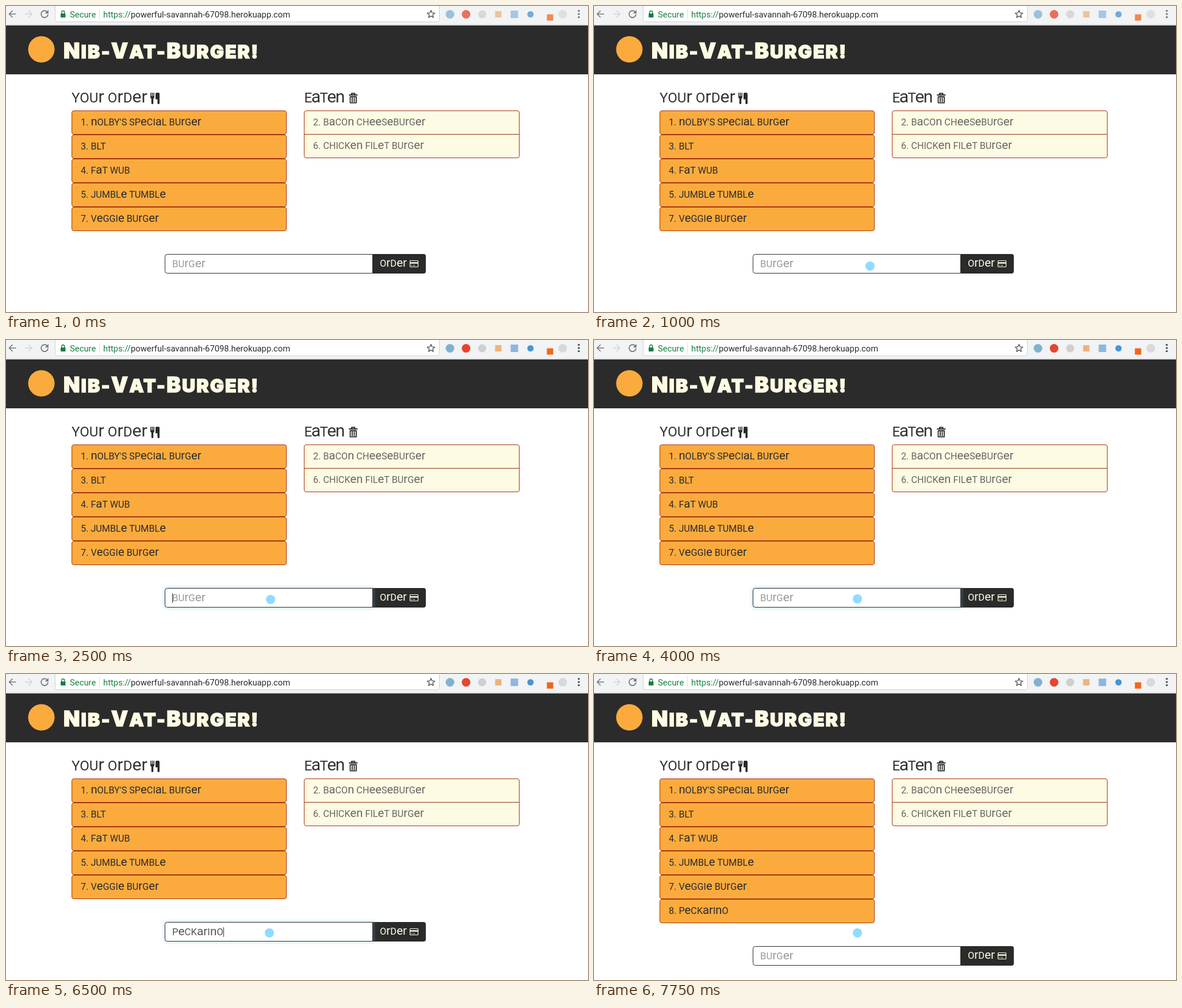
Write an HTML page that moves like this. It is 1012 px wide and 533 px high and loops after 8000 ms.

```html
<!DOCTYPE html>
<html lang="en">
<head>
<meta charset="utf-8">
<title>Burger order</title>
<style>
  html, body { margin: 0; width: 100%; height: 100%; overflow: hidden; background: #fff; }
  svg { display: block; width: 1012px; height: 533px; }
  text { font-family: Roboto, "Open Sans", sans-serif; font-size: 16.2px; fill: #2b2b2b; }
  .low { font-size: 1.25em; }
  .head { font-size: 24.2px; fill: #333; }
  .tight { letter-spacing: -1.6px; }
  .url { font-size: 14.8px; }
  .secure { fill: #1a7f42; }
  .brand { font-family: Inter, "Open Sans", sans-serif; font-weight: 900; font-size: 32px;
    letter-spacing: 2.1px; fill: #fdfbe3; stroke: #fdfbe3; stroke-width: 1.4; }
  .big { font-size: 37px; }
  .field { font-size: 16.7px; fill: #555; }
  .hint { fill: #999; }
  .button { font-size: 16.5px; fill: #fdfbe3; }
  .line { fill: none; stroke-linecap: round; stroke-linejoin: round; }
  .todo { fill: #fbab3e; stroke: #a8320c; }
  .eaten { fill: #fdfbe3; stroke: #a8320c; }
  .muted { fill: #666; }
</style>
</head>
<body>
<svg viewBox="0 0 1012 533">
  <defs>
    <filter id="blur" x="-10%" y="-60%" width="120%" height="220%"><feGaussianBlur stdDeviation="2.6"/></filter>
  </defs>

  <!-- browser bar -->
  <rect width="1012" height="34" fill="#f1f3f4"/>
  <rect y="32.5" width="1012" height="1.5" fill="#c9cbcc"/>
  <rect x="85.5" y="-4.5" width="668" height="32" rx="4" fill="#fff" stroke="#cfd1d2"/>
  <path class="line" d="M17 14H5.5m5.5-5.5L5.5 14l5.5 5.5" stroke="#777" stroke-width="1.6"/>
  <path class="line" d="M33.5 14H45m-5.5-5.5L45 14l-5.5 5.5" stroke="#d2d4d5" stroke-width="1.6"/>
  <g id="reload">
    <path class="line" d="M71.5 10A6 6 0 1 0 73 15" stroke="#757575" stroke-width="1.7"/>
    <path d="M73.8 7v6h-6z" fill="#757575"/>
  </g>
  <path id="stop" class="line" d="M61.5 8.5l11 11m0-11l-11 11" stroke="#666" stroke-width="1.7"/>
  <rect x="95" y="13" width="8.5" height="7" rx="1" fill="#1a7f42"/>
  <path class="line" d="M96.8 13v-2a2.45 2.45 0 0 1 4.9 0v2" stroke="#1a7f42" stroke-width="1.4"/>
  <text class="url secure" x="111" y="20">Secure</text>
  <path d="M162.5 5v18" stroke="#dcdcdc"/>
  <text class="url" x="169" y="20"><tspan class="secure">https://</tspan>powerful-savannah-67098.herokuapp.com</text>
  <path id="star" class="line" stroke="#555" stroke-width="1.4"/>
  <g id="tools"></g>

  <!-- page header -->
  <rect y="34" width="1012" height="85" fill="#2b2b2b"/>
  <circle cx="61.5" cy="75.5" r="23" fill="#fbab3e"/>
  <text id="brand" class="brand" x="100" y="91"></text>

  <!-- lists -->
  <text class="head" x="114" y="168" data-text="Your Order"></text>
  <g fill="#2b2b2b">
    <path d="M251 151h1.5v6h1.2v-6h1.6v6h1.2v-6h1.5v7.5q0 2-1.8 3v8.5q-1.7 1.8-3.4 0v-8.5q-1.8-1-1.8-3z"/>
    <path d="M260 153q0-2 2-2h3q2 0 2 2v17q-1.8 1.8-3.6 0v-7.5H260z"/>
  </g>
  <text class="head tight" x="518.5" y="168"><tspan>E</tspan><tspan data-text="aten"></tspan></text>
  <g class="line" stroke="#2b2b2b">
    <path d="M597 155h13.5m-9.5-.5v-2.3h5.500v2.300" stroke-width="2"/>
    <path d="M598.5 158h10.5v10.7h-10.5zM602 160v6.5m3.5-6.5v6.5" stroke-width="1.8"/>
  </g>
  <g id="todo"></g>
  <rect class="eaten" x="518.5" y="182.5" width="374" height="82" rx="3.5"/>
  <path d="M519 223.5h373" stroke="#8f3318"/>
  <text class="muted" x="534" y="208" data-text="2. Bacon cheeseburger"></text>
  <text class="muted" x="534" y="249" data-text="6. Chicken filet burger"></text>

  <!-- order form -->
  <g id="form">
    <path d="M637 432h89q4 0 4 4v26q0 4-4 4h-89z" fill="#2b2b2b"/>
    <path id="glow" d="M637.5 432.5h-357q-4 0-4 4v25q0 4 4 4h357z" fill="none" stroke="#66afe9" stroke-width="4" filter="url(#blur)"/>
    <path d="M637.5 432.5h-357q-4 0-4 4v25q0 4 4 4h357z" fill="#fff" stroke="#2b2b2b"/>
    <text id="field" class="field" x="289" y="455"></text>
    <rect id="caret" y="441" width="1" height="17" fill="#333"/>
    <text class="button" x="650" y="454" data-text="Order"></text>
    <rect x="702.5" y="443.5" width="14" height="11" rx="1" fill="none" stroke="#fdfbe3" stroke-width="1.2"/>
    <path d="M702.5 447.5h14" stroke="#fdfbe3" stroke-width="2.5"/>
    <path d="M704.5 452h2m1.5 0h3" stroke="#fdfbe3"/>
  </g>

  <circle id="pointer"/>
</svg>
<script>
  const LOOP = 8000, TICK = 250;
  const FOCUS = 1250, SUBMIT = 7000, RELOADED = 7750;
  const ORDER = "Peckarino";
  const $ = id => document.getElementById(id);
  const show = (id, on) => $(id).setAttribute("visibility", on ? "visible" : "hidden");

  // Unicase lettering: capitals, with a few enlarged lowercase forms.
  const unicase = s => s.toUpperCase().replace(/[AENR]+/g,
    c => `<tspan class="low">${c.toLowerCase()}</tspan>`);

  document.querySelectorAll("[data-text]").forEach(el => el.innerHTML = unicase(el.dataset.text));

  $("brand").innerHTML = ["Nib", "Vat", "Burger!"].map(w =>
    `<tspan class="big">${w[0]}</tspan>${w.slice(1).toUpperCase()}`).join("-");

  $("todo").innerHTML = ["1. Nolby's special burger", "3. BLT", "4. Fat Wub",
    "5. Jumble Tumble", "7. Veggie burger", "8. " + ORDER].map((s, i) =>
    `<g><rect class="todo" x="114.5" y="${182.5 + 42 * i}" width="373" height="41" rx="3.5"/>
     <text x="130" y="${208 + 42 * i}">${unicase(s)}</text></g>`).join("");
  $("todo").lastElementChild.id = "added";

  const starPoints = Array.from({ length: 10 }, (_, i) => {
    const r = i % 2 ? 3.2 : 7, a = i * Math.PI / 5;
    return (739 + r * Math.sin(a)).toFixed(2) + " " + (14.5 - r * Math.cos(a)).toFixed(2);
  });
  $("star").setAttribute("d", "M" + starPoints.join("L") + "Z");

  const disc = (x, y, r, c) => `<circle cx="${x}" cy="${y}" r="${r}" fill="${c}"/>`;
  const box = (x, y, s, c) => `<rect x="${x - s / 2}" y="${y - s / 2}" width="${s}" height="${s}" fill="${c}"/>`;
  $("tools").innerHTML =
    disc(772, 14.5, 7.5, "#7fb2d0") + disc(800, 14.5, 7.5, "#e8442e") + disc(828, 14.5, 7, "#cfcfcf") +
    box(856, 14.5, 11, "#eeb27c") + box(884, 14.5, 13, "#8fb6e0") + disc(912, 14.5, 5.5, "#4a94d0") +
    box(946, 20, 11, "#f2661b") + disc(968, 14.5, 7.5, "#d9d9d9") +
    [8.5, 14, 19.5].map(y => disc(996, y, 1.8, "#505050")).join("");

  // Held values: [start ms, ...values]
  const pointerPath = [
    [250, 500, 330], [500, 490, 425], [750, 488, 452], [1000, 480, 453],
    [1250, 456, 472, "ring"], [1750, 456, 470], [2000, 459, 462],
    [2250, 460, 455], [2500, 460, 452], [3750, 458, 451]
  ];
  const typing = [[0, 0], [5250, 1], [5500, 2], [6000, 5], [6250, 7], [6500, 9]];
  const held = (steps, t) => steps.filter(s => s[0] <= t).pop();

  function set(el, attrs) {
    for (const k in attrs) el.setAttribute(k, attrs[k]);
  }

  function drawPointer(t) {
    const p = held(pointerPath, t);
    show("pointer", p);
    if (!p) return;
    const [, cx, cy, ring] = p;
    set($("pointer"), ring
      ? { cx, cy, r: 9.5, fill: "none", stroke: "#bfe8fb", "stroke-width": 1.5 }
      : { cx, cy, r: 8, fill: "#8fdcff", stroke: "none" });
  }

  function drawForm(t) {
    const done = t >= RELOADED;
    const count = done ? 0 : held(typing, t)[1];
    const field = $("field");
    field.classList.toggle("hint", !count);
    field.innerHTML = unicase(count ? ORDER.slice(0, count) : "Burger");

    const blink = t < 1500 || Math.floor((t - 1500) / 500) % 2 === 0;
    show("caret", t >= FOCUS && t < SUBMIT && (count > 0 || blink));
    $("caret").setAttribute("x", Math.round(289 + (count ? field.getComputedTextLength() : 0)));

    show("glow", t >= FOCUS && !done);
    $("glow").setAttribute("opacity", t < 1750 ? .35 : .42);
    $("form").setAttribute("transform", `translate(0 ${done ? 42 : 0})`);
    show("added", done);
  }

  function draw(now) {
    const t = Math.floor(now % LOOP / TICK) * TICK;
    const loading = t >= SUBMIT && t < RELOADED;
    show("stop", loading);
    show("reload", !loading);
    $("tools").setAttribute("opacity", t < FOCUS ? .75 : 1);
    drawPointer(t);
    drawForm(t);
  }

  const start = performance.now();
  function loop() {
    draw(performance.now() - start);
    requestAnimationFrame(loop);
  }
  loop();
</script>
</body>
</html>
```
